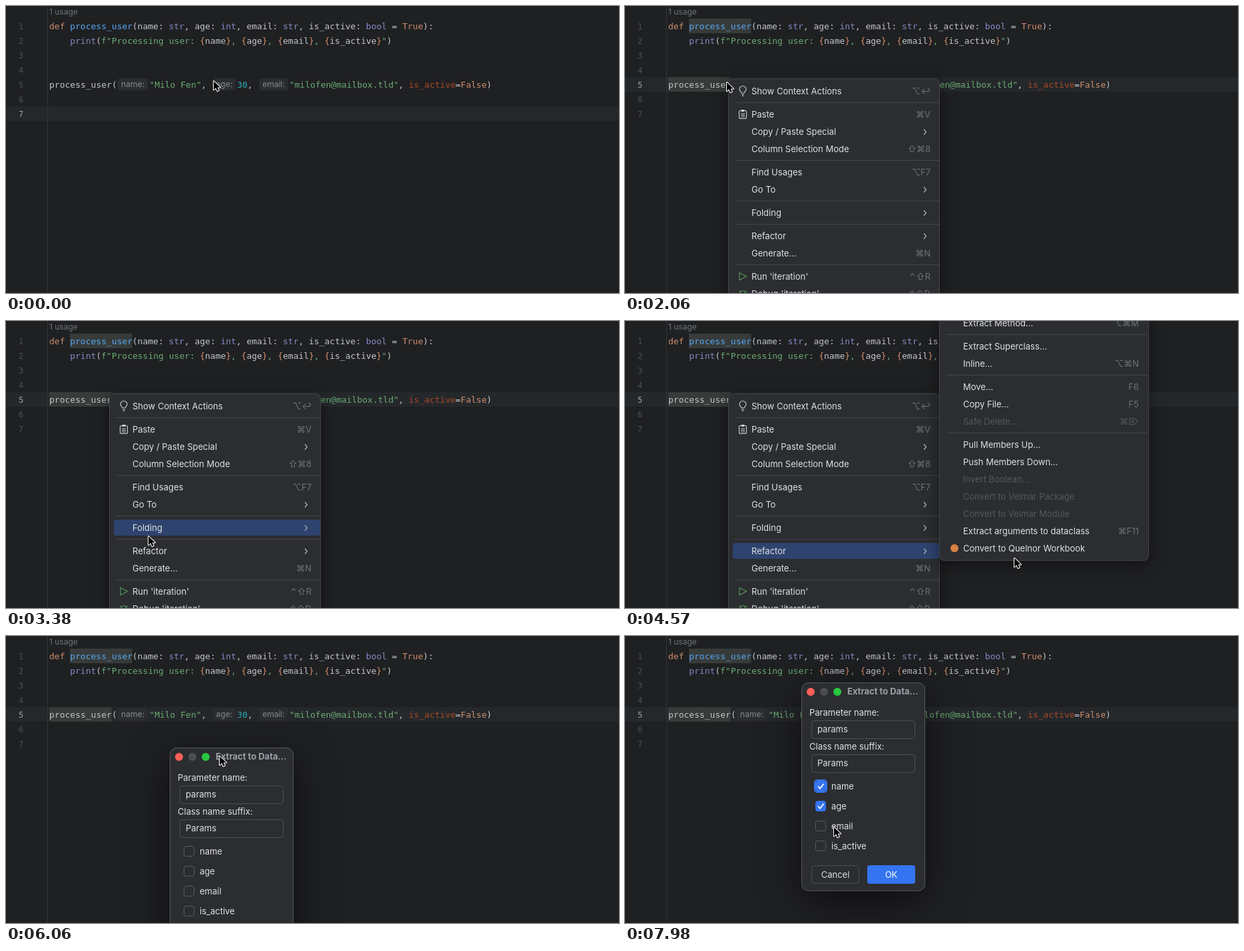
An HTML page with a canvas for the animation above (8000 ms loop, 921 px wide and 432 px high).

```html
<!DOCTYPE html>
<html lang="en">
<head>
<meta charset="utf-8">
<title>Extract arguments</title>
<style>
html, body { margin: 0; width: 100%; height: 100%; overflow: hidden; background: #1f2022; }
canvas { display: block; width: 921px; height: 432px; }
</style>
</head>
<body>
<canvas id="stage" width="921" height="432"></canvas>
<script>
const ctx = document.getElementById('stage').getContext('2d');
const LOOP = 8000, BEAT = 147.7, CHAR = 7.8;
const UI = '13px Inter, "DejaVu Sans", sans-serif';
const SMALL = '12px Inter, "DejaVu Sans", sans-serif';
const BOLD = 'bold 13px Inter, sans-serif';
const MONO = '13px "DejaVu Sans Mono", "Noto Sans Mono", monospace';
const C = {
  bg: '#1f2022', row: '#25282b', text: '#c3c5cb', key: '#cf8e6d', fn: '#56a8f5',
  type: '#8888c6', str: '#6aab73', num: '#2aacb8', arg: '#aa4926', panel: '#2b2d30',
  line: '#43454a', ui: '#dfe1e5', dim: '#6f737a', off: '#55585e', pick: '#2e436e',
  edge: '#55585d', icon: '#ced0d6', run: '#57965c', blue: '#3574f0'
};

// Beats at which the scene changes
const CARET = 3, SELECT = 12, MENU = 14, SUBMENU = 25, CLOSE = 35, DIALOG = 37,
  DRAG = 40, DROP = 44, FOCUS = 50, CHECK = 51, CHECK2 = 53;

function text(s, x, y, color = C.ui, font = UI, align = 'left') {
  ctx.font = font;
  ctx.fillStyle = color;
  ctx.textAlign = align;
  ctx.fillText(s, x, y);
}
const label = (s, x, mid, color, font, align) => text(s, x, mid + 4.7, color, font, align);

function rect(x, y, w, h, fill) {
  ctx.fillStyle = fill;
  ctx.fillRect(x, y, w, h);
}

function box(x, y, w, h, r, fill, edge, width = 1) {
  ctx.beginPath();
  ctx.roundRect(x, y, w, h, r);
  if (fill) { ctx.fillStyle = fill; ctx.fill(); }
  if (edge) { ctx.strokeStyle = edge; ctx.lineWidth = width; ctx.stroke(); }
}

function dot(x, y, r, fill) {
  ctx.beginPath();
  ctx.arc(x, y, r, 0, 7);
  ctx.fillStyle = fill;
  ctx.fill();
}

function stroke(d, color, width = 1) {
  ctx.strokeStyle = color;
  ctx.lineWidth = width;
  ctx.stroke(new Path2D(d));
}

function panel(x, y, w, h, r, edge, blur, alpha) {
  ctx.save();
  ctx.shadowColor = `rgba(0,0,0,${alpha})`;
  ctx.shadowBlur = blur;
  ctx.shadowOffsetY = blur / 4;
  box(x, y, w, h, r, C.panel);
  ctx.restore();
  box(x + .5, y + .5, w - 1, h - 1, r, null, edge);
}

// ---- pointer: moves as [first beat, last beat, x, y] ----
const MOVES = [[0, 1, 316, 119], [6, 12, 152, 119], [13, 14, 152, 114], [16, 18, 158, 127],
  [20, 25, 217, 336], [27, 29, 480, 275], [29, 31, 584, 356], [32, 33, 570, 323],
  [CLOSE, DRAG, 294, 315], [DRAG, DROP, 339, 82], [45, 49, 292, 224], [CHECK, 54, 313, 287]];
const ARROW = new Path2D('M1 1v13.200l3.200-2.900 2.200 4.800 2.400-1.100-2.100-4.600h4.300z');

function pointerAt(beat) {
  let x = 311, y = 112;
  for (const [from, to, tx, ty] of MOVES) {
    const u = Math.min(1, Math.max(0, (beat - from) / (to - from)));
    const ease = 1 - (1 - u) ** 3;
    x += (tx - x) * ease;
    y += (ty - y) * ease;
  }
  return { x, y };
}

function pointer(beat, { x, y }) {
  ctx.save();
  ctx.translate(Math.round(x), Math.round(y));
  if (beat >= 1 && beat < MENU) {
    stroke('M-2.500-8q2.500 0 2.500 2v12q0 2-2.500 2M2.500-8q-2.500 0-2.500 2v12q0 2 2.500 2', '#c8c9cc');
  } else {
    ctx.lineJoin = 'round';
    ctx.strokeStyle = '#fff';
    ctx.lineWidth = 2;
    ctx.stroke(ARROW);
    ctx.fillStyle = '#000';
    ctx.fill(ARROW);
  }
  ctx.restore();
}

// ---- editor ----
function code(x, y, tokens) {
  for (const [s, color] of tokens) {
    text(s, x, y, C[color], MONO);
    x += s.length * CHAR;
  }
  return x;
}

// Inlay hint; returns where the code goes on
function hint(s, x, w) {
  box(x, 109, w, 18, 4, C.panel);
  text(s, x + w / 2, 122, '#868a91', SMALL, 'center');
  return x + w + 2.3;
}

const param = (name, type, tail) => [[name + ': ', 'text'], [type, 'type'], [tail, 'text']];
const slot = (name, tail) => [['{', 'key'], [name, 'text'], ['}', 'key'], [tail, 'str']];

const DEF = [['def ', 'key'], ['process_user', 'fn'], ['(', 'text'],
  ...param('name', 'str', ', '), ...param('age', 'int', ', '), ...param('email', 'str', ', '),
  ...param('is_active', 'bool', ' = '), ['True', 'key'], ['):', 'text']];
const BODY = [['print', 'type'], ['(', 'text'], ['f"Processing user: ', 'str'],
  ...slot('name', ', '), ...slot('age', ', '), ...slot('email', ', '), ...slot('is_active', '"'),
  [')', 'text']];

function editor(beat) {
  const current = beat < CARET ? 7 : 5;
  rect(0, 0, 921, 432, C.bg);
  rect(0, 22 * current - 3, 921, 22, C.row);
  rect(62, 0, 1, 432, '#313438');
  if (beat >= SELECT) {
    rect(96, 19, 93.5, 22, '#373b39');
    rect(65, 107, 93.5, 22, '#373b39');
  }
  for (let n = 1; n <= 7; n++)
    text(n, 22.5, 13 + 22 * n, n === current ? '#a1a3ab' : '#4b5059',
      MONO.replace('13px', '12px'), 'center');
  text('1 usage', 65, 13, C.dim, SMALL);
  code(65, 35, DEF);
  code(65 + 4 * CHAR, 57, BODY);
  let x = code(65, 123, [['process_user(', 'text']]) + 1.600;
  x = code(hint('name:', x, 45), 123, [['"Milo Fen"', 'str'], [', ', 'text']]) + 2;
  x = code(hint('age:', x, 34), 123, [['30', 'num'], [', ', 'text']]) + 2;
  code(hint('email:', x, 43), 123, [['"milofen@mailbox.tld"', 'str'], [', ', 'text'],
    ['is_active', 'arg'], ['=', 'text'], ['False', 'key'], [')', 'text']]);
}

// ---- menus: "label|shortcut|off", an empty string is a separator ----
function layout(items, mid) {
  const rows = [];
  for (const item of items) {
    const [name, keys, off] = item.split('|');
    rows.push({ name, keys, off, mid });
    mid += name ? 26 : 9;
  }
  return rows;
}

const MAIN = layout(['Show Context Actions|⌥↩', '', 'Paste|⌘V', 'Copy / Paste Special|>',
  'Column Selection Mode|⇧⌘8', '', 'Find Usages|⌥F7', 'Go To|>', '', 'Folding|>', '',
  'Refactor|>', 'Generate...|⌘N', '', "Run 'iteration'|⌃⇧R", "Debug 'iteration'|⌃⇧D"], 128);
const SUB = layout(['Extract Method...|⌥⌘M', '', 'Extract Superclass...', 'Inline...|⌥⌘N', '',
  'Move...|F6', 'Copy File...|F5', 'Safe Delete...|⌘⌦|off', '', 'Pull Members Up...',
  'Push Members Down...', 'Invert Boolean...||off', 'Convert to Velmar Package||off',
  'Convert to Velmar Module||off', 'Extract arguments to dataclass|⌘F11',
  'Convert to Quelnor Workbook'], 3);

function list(rows, x, right, isPicked) {
  for (const row of rows) {
    const { name, keys, off, mid } = row;
    if (!name) {
      rect(x + 10, mid - 9, right - x + 3, 1, C.line);
      continue;
    }
    if (!off && isPicked(row)) box(x + 7, mid - 12, right - x + 6, 24, 4, C.pick);
    label(name, x + 35, mid, off ? C.off : C.ui);
    if (keys === '>') stroke(`M${right - 10} ${mid - 3.5}l3.500 4-3.500 4`, '#b0b3b9', 1.2);
    else if (keys) label(keys, right, mid, off ? C.off : C.dim, UI, 'right');
  }
}

function menus(beat, p) {
  const open = beat >= SUBMENU;
  const over = (row, left) => p.x >= left && Math.abs(p.y - row.mid) < 13;
  panel(155, 109, 318, 400, 8, C.line, 24, .45);
  list(MAIN, 155, 459, row => open ? row.name === 'Refactor' : over(row, 155));
  stroke('M175 131c0-2-3-3-3-5.500a5 5 0 0 1 10 0c0 2.500-3 3.500-3 5.500zM175 133.500h4M176 135.500h2', C.icon, 1.1);
  box(171.5, 157.5, 11, 12, 2, null, C.icon, 1.1);
  box(174.5, 156, 5, 3, 1, C.icon);
  stroke('M174 162h6M174 164.500h6M174 167h6', C.icon);
  stroke('M172 401.500v11l10.500-5.500z', C.run, 1.2);
  stroke('M173.500 434v-2a3.500 3.500 0 0 1 7 0v2M171 429l3 2M183 429l-3 2', C.run, 1.2);
  if (!open) return;
  panel(472, -40, 315, 401, 8, C.line, 24, .45);
  list(SUB, 473, 772, row => over(row, 473));
  dot(495, 342, 6, '#d98143');
}

// ---- dialog ----
function field(name, s, y) {
  label(name, 277, y - 11.5);
  box(280.5, y + .5, 155, 27, 4, null, '#4e5157');
  label(s, 289, y + 13.5);
}

function check(name, y, on, focus) {
  if (focus) box(285, y - 9, 18, 18, 4, null, C.blue, 2);
  box(286.5, y - 7.5, 15, 15, 3, on && C.blue, on ? C.blue : '#5a5d63');
  if (on) stroke(`M290 ${y}l3 3.500 5.500-7`, '#fff', 1.8);
  label(name, 310, y);
}

function dialog(beat) {
  // The window hangs on the pointer while dragged by its title
  const grip = pointerAt(Math.min(DROP, Math.max(DRAG, beat))), rest = pointerAt(DROP);
  ctx.save();
  ctx.translate(Math.round(grip.x - rest.x), Math.round(grip.y - rest.y));
  panel(265, 70, 186, 314, 10, C.edge, 60, .6);
  ['#ff5f57', '#4d4e51', '#28c840'].forEach((c, i) => dot(279 + 20 * i, 84, 6, c));
  label('Extract to Data...', 334, 83.5, '#9da0a8', BOLD);
  field('Parameter name:', 'params', 127);
  field('Class name suffix:', 'Params', 178);
  const checked = [beat >= CHECK, beat >= CHECK2];
  ['name', 'age', 'email', 'is_active'].forEach((name, i) =>
    check(name, 226 + 30 * i, checked[i], i === 0 && beat >= FOCUS));
  box(280.5, 345.5, 71, 27, 4, null, '#4e5157');
  label('Cancel', 316, 359, C.ui, UI, 'center');
  const inset = beat < FOCUS ? 1 : 0;
  if (inset) box(363, 344, 74, 30, 5, null, C.blue, 2);
  box(364 + inset, 345 + inset, 72 - 2 * inset, 28 - 2 * inset, 4, C.blue);
  label('OK', 400, 359, '#fff', UI, 'center');
  ctx.restore();
}

function draw(t) {
  const beat = Math.floor((t + 20) / BEAT), p = pointerAt(beat);
  editor(beat);
  if (beat >= MENU && beat < CLOSE) menus(beat, p);
  if (beat >= DIALOG) dialog(beat);
  pointer(beat, p);
}

const start = performance.now();
function tick() {
  draw((performance.now() - start) % LOOP);
  requestAnimationFrame(tick);
}
tick();
</script>
</body>
</html>
```
